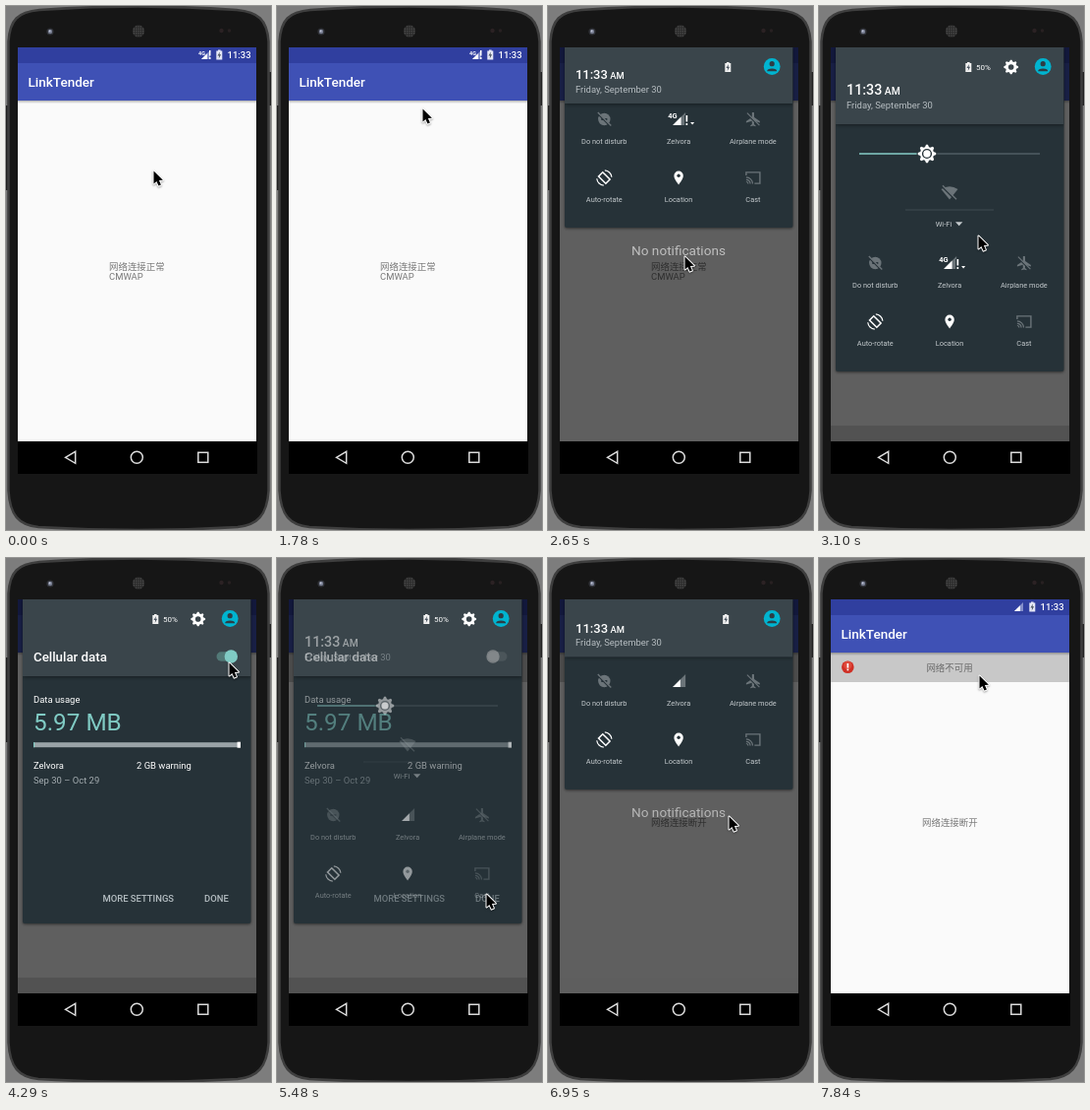
An HTML page with a canvas for the animation above (7.99 s loop, 270 px wide and 532 px high).

```html
<!DOCTYPE html>
<html lang="en">
<head>
<meta charset="utf-8">
<title>Network state demo</title>
<style>
  html, body { margin: 0; width: 100%; height: 100%; overflow: hidden; background: #7d7d7d; }
  canvas { display: block; width: 270px; height: 532px; }
</style>
</head>
<body>
<canvas id="stage"></canvas>
<script>
const LOOP = 7990, STEPS = 54, W = 270, H = 532;
const SANS = 'Roboto, sans-serif';
const CJK = 'Roboto, "Noto Sans CJK SC", "Noto Sans CJK", sans-serif';
const TEAL = '#80cbc4', DIM = '#6b7479', OPEN = 371;
const APP = 'LinkTender', CARRIER = 'Zelvora';

const canvas = document.getElementById('stage');
const c = canvas.getContext('2d');
const ratio = window.devicePixelRatio || 1;
canvas.width = W * ratio;
canvas.height = H * ratio;

// Keys: [step, value, ...], linear between them
const pointer = [
  [5, 150, 167], [8, 154, 105], [10, 145, 51], [11, 145, 51], [12, 148, 104],
  [18, 139, 254], [19, 140, 280], [20, 152, 258], [21, 162, 233], [23, 134, 262],
  [25, 136, 261], [27, 196, 160], [29, 227, 106], [32, 227, 107], [35, 213, 341],
  [37, 213, 341], [41, 171, 390], [42, 171, 390], [45, 174, 318], [47, 184, 262],
  [50, 197, 213], [53, 163, 119]
];
const shade = [
  [12, 42], [13, 62], [14, 85], [16, 145], [18, 225], [19, 355], [20, OPEN],
  [45, OPEN], [46, 330], [47, 235], [48, 135], [49, 65], [50, 42]
];
const detailAlpha = [[24, 0], [25, .5], [26, 1], [36, 1], [37, .5], [38, 0]];

const clamp = v => Math.max(0, Math.min(1, v));

function at(keys, s) {
  if (s <= keys[0][0]) return keys[0].slice(1);
  for (let i = 1; i < keys.length; i++) {
    const a = keys[i - 1], b = keys[i];
    if (s <= b[0]) {
      const u = (s - a[0]) / (b[0] - a[0]);
      return a.slice(1).map((v, j) => v + (b[j + 1] - v) * u);
    }
  }
  return keys[keys.length - 1].slice(1);
}

function rect(x, y, w, h, color) {
  c.fillStyle = color;
  c.fillRect(x, y, w, h);
}

function disc(x, y, r, color) {
  c.beginPath();
  c.arc(x, y, r, 0, 7);
  c.fillStyle = color;
  c.fill();
}

function ring(x, y, r, color, width, from = 0, to = Math.PI * 2) {
  c.beginPath();
  c.arc(x, y, r, from, to);
  c.strokeStyle = color;
  c.lineWidth = width;
  c.stroke();
}

function trace(points, closed) {
  c.beginPath();
  points.forEach(([x, y]) => c.lineTo(x, y));
  if (closed) c.closePath();
}

function poly(points, color) {
  trace(points, true);
  c.fillStyle = color;
  c.fill();
}

function line(points, color, width, closed) {
  trace(points, closed);
  c.strokeStyle = color;
  c.lineWidth = width;
  c.stroke();
}

function text(str, x, y, size, color, weight = 400, align = 'left', family = SANS) {
  c.font = `${weight} ${size}px ${family}`;
  c.textAlign = align;
  c.fillStyle = color;
  c.fillText(str, x, y);
}

function group(x, y, draw, alpha = 1) {
  c.save();
  c.translate(x, y);
  c.globalAlpha *= alpha;
  draw();
  c.restore();
}

function box(x, y, w, h, r) {
  c.beginPath();
  c.roundRect(x, y, w, h, r);
}

// Signal wedge with its lower right corner at (x, y)
function wedge(x, y, size, dim, level) {
  poly([[x, y], [x - size, y], [x, y - size]], dim);
  const k = size * level;
  poly([[x - size + k, y], [x - size, y], [x - size + k, y - k]], '#fff');
}

function battery(x, y, body) {
  rect(x - 1.3, y - 5, 2.6, 1.5, body);
  rect(x - 3, y - 4, 6, 9, body);
  poly([[x + .6, y - 3], [x - 1.8, y + 1], [x - .2, y + 1], [x - .6, y + 4], [x + 1.8, y - .2], [x + .2, y - .2]], '#4a5460');
}

function phone() {
  rect(0, 0, W, H, '#7d7d7d');
  rect(0, 101, 4, 86, '#202020');
  rect(266, 67, 4, 34, '#202020');
  c.beginPath();
  c.moveTo(2.5, 36);
  c.bezierCurveTo(4, 14, 12, 6, 34, 4);
  c.quadraticCurveTo(135, -3, 235, 4);
  c.bezierCurveTo(257, 6, 266, 14, 267.5, 36);
  c.lineTo(267.5, 492);
  c.bezierCurveTo(266, 517, 256, 527, 236, 529);
  c.quadraticCurveTo(135, 535, 33, 529);
  c.bezierCurveTo(13, 527, 4, 517, 2.5, 492);
  c.closePath();
  c.fillStyle = '#161616';
  c.fill();
  c.strokeStyle = '#3e3e3e';
  c.lineWidth = 2.5;
  c.stroke();
  disc(45, 26, 3.6, '#303238');
  disc(45, 26, 2.2, '#777d91');
  disc(44.6, 25.4, .9, '#c8cce0');
  disc(135, 25.5, 6.3, '#292929');
  for (let i = -2; i <= 2; i++)
    for (let j = -2; j <= 2; j++)
      if (i * i + j * j < 7) disc(135 + i * 2.3, 25.5 + j * 2.3, .7, '#555');
  disc(219.5, 25, 2.2, '#2b2224');
  disc(227.5, 25, 1.8, '#282122');
}

function navBar() {
  rect(12, 442, 244, 33, '#000');
  line([[60.5, 458.3], [70.7, 452.3], [70.7, 464.3]], '#dcdcdc', 1.5, true);
  ring(133.3, 458.3, 6, '#dcdcdc', 1.5);
  c.strokeRect(195.8, 453.3, 10, 10);
}

function app(online) {
  rect(12, 42, 243, 400, '#fafafa');
  rect(12, 42, 243, 16, '#303f9f');
  rect(12, 58, 243, 38, '#3f51b5');
  if (online) {
    wedge(208, 54, 9, '#8590cb', .65);
    text('4G', 196, 49.5, 5.5, '#fff', 700);
    rect(207, 45, 1.5, 5.5, '#fff');
    rect(207, 52, 1.5, 2, '#fff');
  } else {
    wedge(208, 54, 9, '#8590cb', .65);
  }
  battery(217.3, 49.5, '#e5e8f7');
  text('11:33', 249.5, 53.2, 9.45, '#fff', 500, 'right');
  text(APP, 22.5, 82, 13.5, '#fff', 500);

  if (online) {
    text('网络连接正常', 105, 267.5, 9.45, '#777', 400, 'left', CJK);
    text('CMWAP', 105, 278.2, 9.45, '#777');
  } else {
    rect(12, 96, 243, 30, '#c8c8c8');
    disc(29.3, 110.7, 6.3, '#cf2f25');
    disc(29.3, 109, 4.2, '#df4a3c');
    rect(28.5, 107, 1.7, 4.6, '#fff');
    rect(28.5, 112.6, 1.7, 1.7, '#fff');
    text('网络不可用', 133, 114.5, 9.45, '#696969', 400, 'center', CJK);
    text('网络连接断开', 105, 272.3, 9.45, '#777', 400, 'left', CJK);
  }
  const g = c.createLinearGradient(0, 96, 0, 99);
  g.addColorStop(0, 'rgba(0,0,0,.28)');
  g.addColorStop(1, 'rgba(0,0,0,0)');
  rect(12, 96, 243, 3, g);
}

function gear(x, y, r, teeth, color, hole) {
  c.beginPath();
  for (let i = 0; i < teeth * 4; i++) {
    const a = (i - .5) / (teeth * 4) * Math.PI * 2;
    const k = i % 4 < 2 ? r : r * .76;
    c.lineTo(x + Math.cos(a) * k, y + Math.sin(a) * k);
  }
  c.closePath();
  c.fillStyle = color;
  c.fill();
  disc(x, y, r * .38, hole);
}

const icons = {
  disturb() {
    disc(0, 0, 6.2, DIM);
    rect(-3, -1, 6, 2, '#263238');
    line([[-7, -6], [6, 7]], '#263238', 1.5);
    line([[-6.5, -7], [7, 6.5]], DIM, 1.3);
  },
  plane() {
    poly([[-1, -7], [1, -7], [1.2, -2], [7, 2], [7, 3.5], [1.2, 1.8], [1, 5], [2.6, 6.3], [2.6, 7.3],
      [0, 6.6], [-2.6, 7.3], [-2.6, 6.3], [-1, 5], [-1.2, 1.8], [-7, 3.5], [-7, 2], [-1.2, -2]], DIM);
    line([[-6, -5], [6.2, 7]], '#263238', 1.4);
    line([[-6, -6.3], [6.5, 6.2]], DIM, 1.2);
  },
  rotate() {
    c.save();
    c.rotate(-Math.PI / 4);
    c.strokeStyle = '#fff';
    c.lineWidth = 1.5;
    c.strokeRect(-3, -5.2, 6, 10.4);
    c.restore();
    ring(0, 0, 7.6, '#fff', 1.2, -1.5, -.1);
    ring(0, 0, 7.6, '#fff', 1.2, 1.64, 3.04);
  },
  pin() {
    c.beginPath();
    c.arc(0, -2.2, 4.7, Math.PI, 0);
    c.bezierCurveTo(4.7, 1, 1.5, 5, 0, 7);
    c.bezierCurveTo(-1.5, 5, -4.7, 1, -4.7, -2.2);
    c.fillStyle = '#fff';
    c.fill();
    disc(0, -2.2, 1.7, '#263238');
  },
  cast() {
    line([[-7, -2.5], [-7, -5.6], [7, -5.6], [7, 5.6], [1.5, 5.6]], DIM, 1.4);
    for (const r of [2, 4.2, 6.6]) ring(-7, 6, r, DIM, 1.2, -Math.PI / 2, 0);
  },
  wifiOff() {
    c.beginPath();
    c.moveTo(0, 7);
    c.lineTo(-8.5, -3.5);
    c.quadraticCurveTo(0, -9, 8.5, -3.5);
    c.closePath();
    c.fillStyle = DIM;
    c.fill();
    line([[-7.5, -6], [6, 7.5]], '#263238', 1.6);
    line([[-7, -7.3], [7, 6.7]], DIM, 1.3);
  },
  online() {
    wedge(7, 6, 13, '#6b7479', .65);
    rect(6, -4, 4, 11, '#263238');
    rect(7.4, -4, 1.7, 6.5, '#fff');
    rect(7.4, 4, 1.7, 2, '#fff');
    text('4G', -10.8, -.6, 7.5, '#fff', 700);
    poly([[12, 3], [16, 3], [14, 5.6]], '#fff');
  },
  offline() {
    wedge(7, 6, 13, '#6b7479', .6);
  }
};

function tiles(online) {
  rect(41, 149.3, 184, 1.4, '#536067');
  rect(41, 149.3, 62, 1.4, TEAL);
  disc(110, 150, 10.5, '#263238');
  gear(110, 150, 9.3, 8, '#fff', '#fff');
  ring(110, 150, 4.4, '#263238', 1.4);
  group(133, 189.5, icons.wifiOff);
  rect(88, 206.5, 90, 1, '#3f4b51');
  text('Wi-Fi', 127, 224, 7.6, '#c3c9cc', 400, 'center');
  poly([[139, 219.3], [146.4, 219.3], [142.7, 223.2]], '#c3c9cc');

  const rows = [
    [['disturb', 'Do not disturb'], [online ? 'online' : 'offline', CARRIER], ['plane', 'Airplane mode']],
    [['rotate', 'Auto-rotate'], ['pin', 'Location'], ['cast', 'Cast']]
  ];
  rows.forEach((row, r) => row.forEach(([icon, label], i) => {
    const x = 57.3 + i * 75.8, y = 261 + r * 59.5;
    group(x, y, icons[icon]);
    text(label, x, y + 24.5, 7.4, '#c3c9cc', 400, 'center');
  }));
}

function detail(online) {
  text('Data usage', 28, 146.5, 9.45, '#fff');
  text('5.97 MB', 28, 175, 24.3, TEAL);
  rect(28, 187.2, 211, 5, '#9aa3a7');
  rect(28, 187.2, 1.2, 5, TEAL);
  rect(235.6, 186.7, 3.4, 6, '#fff');
  text(CARRIER, 28, 213.5, 9.45, '#fff');
  text('2 GB warning', 133, 213.5, 9.45, '#fff');
  text('Sep 30 – Oct 29', 28, 229, 9.45, '#a5adb1');
  text('MORE SETTINGS', 98.5, 349, 9.45, '#b4bdc1', 500);
  text('DONE', 202, 349, 9.45, '#b4bdc1', 500);
}

function toggle(k) {
  box(214.5, 95.3, 20, 9.4, 4.7);
  c.fillStyle = k > .5 ? '#527977' : '#5c666b';
  c.fill();
  disc(220 + 9.3 * k, 100, 6.7, k > .5 ? TEAL : '#b9b9b9');
}

function header(bottom, p, fade, on) {
  c.save();
  c.shadowColor = 'rgba(0,0,0,.45)';
  c.shadowBlur = 4 * ratio;
  c.shadowOffsetY = ratio;
  rect(17, 42, 232.5, bottom - 42, '#3a454b');
  c.restore();
  const lift = 120 - bottom, size = 14.3 - lift * .065;
  group(0, 0, () => {
    const y = 89.8 - lift * .73;
    text('11:33', 28, y, size, '#fff', 500);
    const w = c.measureText('11:33').width;
    text('AM', 30.5 + w, y, size * .72, '#fff', 500);
    text('Friday, September 30', 28, 103.8 - lift * .76, 9.45, '#b6bdc1');
  }, 1 - fade);
  group(0, 0, () => {
    text('Cellular data', 28, 105, 13.3, '#fff', 500);
    toggle(on);
  }, fade);

  battery(183.3 - 31 * p, 62, '#f0f0f0');
  group(0, 0, () => {
    text('50%', 160, 65, 8, '#fff');
    gear(195.7, 62, 7.4, 8, '#fff', '#3a454b');
  }, clamp(p * 1.5 - .4));
  disc(228.2, 61.5, 8.4, '#00b4d0');
  disc(228.2, 58.7, 2.6, '#2d3d45');
  c.beginPath();
  c.ellipse(228.2, 66.2, 5, 2.8, 0, Math.PI, 0);
  c.fillStyle = '#2d3d45';
  c.fill();
}

function panel(bottom, fade, on, online) {
  const p = clamp((bottom - 225) / (OPEN - 225));
  rect(12, 42, 243, 400, `rgba(0,0,0,${.62 * clamp((bottom - 42) / 90)})`);
  rect(12, 426, 243, 16, `rgba(0,0,0,${.14 * p})`);
  text('No notifications', 133, bottom + 28, 13.6, `rgba(255,255,255,${.6 * clamp(1 - p * 1.3)})`, 400, 'center');

  const full = Math.max(bottom, 85);
  c.translate(0, bottom - full);
  c.save();
  c.shadowColor = 'rgba(0,0,0,.5)';
  c.shadowBlur = 3 * ratio;
  c.shadowOffsetY = ratio;
  box(17, 42, 232.5, full - 42, [0, 0, 2, 2]);
  c.fillStyle = '#263238';
  c.fill();
  c.restore();
  c.save();
  box(17, 42, 232.5, full - 42, 0);
  c.clip();
  group(0, full - OPEN, () => tiles(online), 1 - fade);
  group(0, 0, () => detail(online), fade);
  header(120 - (OPEN - full) * .144, p, fade, on);
  c.restore();
}

function arrow(x, y) {
  group(x, y, () => {
    c.shadowColor = 'rgba(0,0,0,.35)';
    c.shadowBlur = 2 * ratio;
    c.shadowOffsetY = ratio;
    const shape = [[.5, .5], [.5, 13.6], [3.4, 10.9], [5.5, 15.6], [7.9, 14.6], [5.9, 9.9], [9.9, 9.7]];
    c.lineJoin = 'round';
    line(shape, '#fff', 2, true);
    c.shadowColor = 'transparent';
    poly(shape, '#000');
  });
}

function draw(ms) {
  const s = Math.min(STEPS - 1, Math.floor(ms / LOOP * STEPS + .1));
  const online = s < 32;
  const [bottom] = at(shade, s);
  const [fade] = at(detailAlpha, s);
  const on = s < 31 ? 1 : s === 31 ? .4 : 0;

  c.setTransform(ratio, 0, 0, ratio, 0, 0);
  phone();
  c.save();
  c.beginPath();
  c.rect(12, 42, 243, 400);
  c.clip();
  app(online);
  if (bottom > 42) panel(bottom, fade, on, online);
  c.restore();
  navBar();
  arrow(...at(pointer, s));
}

let start;
function tick(now) {
  start ??= now;
  draw((now - start) % LOOP);
  requestAnimationFrame(tick);
}
requestAnimationFrame(tick);
</script>
</body>
</html>
```
